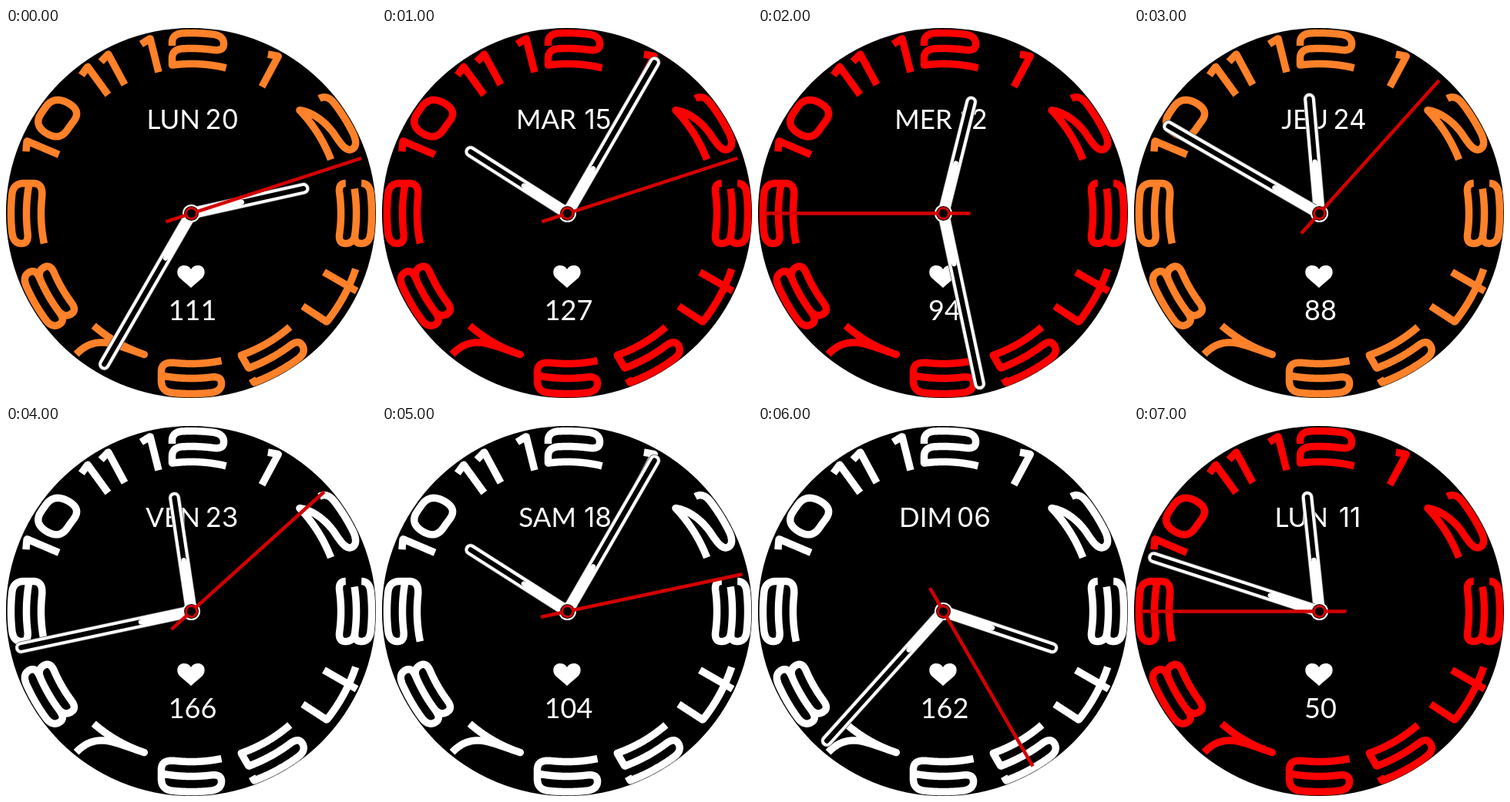
Animation, 480 px wide and 480 px high, one loop 8 s. Source, as an HTML page with a canvas:

```html
<!DOCTYPE html>
<html lang="fr">
<head>
<meta charset="utf-8">
<style>
  html, body { margin: 0; width: 100%; height: 100%; overflow: hidden; background: #fff; }
  canvas { display: block; }
</style>
</head>
<body>
<canvas id="face" width="480" height="480"></canvas>
<script>
const ctx = document.getElementById('face').getContext('2d');
const ORANGE = '#ff8129', RED = '#ff0000', WHITE = '#ffffff';

// numeral colour, weekday, date, pulse, hour, minute, second
const STATES = [
  [ORANGE, 'LUN', '20', 111, 2, 35, 12],
  [RED, 'MAR', '15', 127, 10, 5, 12],
  [RED, 'MER', '12', 94, 12, 28, 45],
  [ORANGE, 'JEU', '24', 88, 11, 50, 7],
  [WHITE, 'VEN', '23', 166, 11, 43, 8],
  [WHITE, 'SAM', '18', 104, 10, 5, 13],
  [WHITE, 'DIM', '06', 162, 3, 37, 25],
  [RED, 'LUN', '11', 50, 11, 48, 45],
];

// Bends a flat outline so that each y becomes a radius around the dial centre
function bend(d) {
  const bent = new Path2D();
  const flat = document.createElementNS('http://www.w3.org/2000/svg', 'path');
  for (const part of d.split('M').slice(1)) {
    flat.setAttribute('d', 'M' + part);
    const length = flat.getTotalLength(), steps = Math.ceil(length);
    for (let i = 0; i <= steps; i++) {
      const { x, y } = flat.getPointAtLength(length * i / steps);
      bent.lineTo(x, Math.sign(y) * Math.sqrt(y * y - x * x));
    }
    bent.moveTo(0, 0);
  }
  return bent;
}

function bendParts(d) {
  const whole = new Path2D();
  for (const part of d.split('M').slice(1)) whole.addPath(bend('M' + part));
  return whole;
}

// Numerals, each turned by its own angle around the dial centre
const ONE = 'M-10 -229L3 -233V-188';
const SIX = 'M39 195H-20Q-39 195 -39 209V221Q-39 234 -25 234H25Q39 234 39 224Q39 214 25 214H-38';
const NUMERALS = [
  [-14, ONE],
  [0, 'M-25 -219V-223Q-25 -234 -11 -234H28Q42 -234 42 -224Q42 -214 28 -214H-11Q-25 -214 -25 -203V-194H45'],
  [28.2, ONE],
  [60, 'M-46 -223Q-46 -234 -31 -234H14Q33 -234 32 -224Q31 -214 4 -212Q-31 -208 -46 -194H30'],
  [90, 'M-39 -224Q-39 -234 -26 -234H26Q39 -234 39 -224Q39 -214 27 -214H-32M27 -214Q39 -214 39 -204Q39 -194 26 -194H-26Q-39 -194 -39 -204'],
  [-60, 'M-32 188L-34 225H44M20 188V237'],
  [-30, 'M37 195H-36V214H25Q39 214 39 224Q39 234 25 234H-39V228'],
  [0, SIX],
  [30, 'M-37 193H39Q5 193 -12 201Q-32 211 -38 236'],
  [60, 'M-22 214Q-35 214 -35 204Q-35 194 -22 194H22Q35 194 35 204Q35 214 22 214H-25Q-39 214 -39 224Q-39 234 -25 234H25Q39 234 39 224Q39 214 25 214'],
  [90, SIX],
  [-67, ONE],
  [-60, 'M14 -234H26Q44 -234 44 -214Q44 -194 26 -194H14Q-4 -194 -4 -214Q-4 -234 14 -234Z'],
  [-36, ONE],
  [-28.3, ONE],
].map(([angle, d]) => [angle, bendParts(d)]);

const HEART = new Path2D('M240 337L225 324C220 318 222 308 231 308Q237 308 240 313Q243 308 249 308C258 308 260 318 255 324Z');

function turned(degrees, draw) {
  ctx.save();
  ctx.translate(240.5, 240.5);
  ctx.rotate(degrees * Math.PI / 180);
  draw();
  ctx.restore();
}

function bar(from, to, width, color, cap = 'round') {
  ctx.lineCap = cap;
  ctx.lineWidth = width;
  ctx.strokeStyle = color;
  ctx.beginPath();
  ctx.moveTo(0, -from);
  ctx.lineTo(0, -to);
  ctx.stroke();
}

function disc(x, y, radius, color) {
  ctx.fillStyle = color;
  ctx.beginPath();
  ctx.arc(x, y, radius, 0, 2 * Math.PI);
  ctx.fill();
}

function hand(degrees, length) {
  turned(degrees, () => {
    bar(8, length, 16, '#555');
    bar(8, length, 14.5, WHITE);
    bar(66, 70, 6.5, '#000', 'butt');
    bar(70, length, 6.5, '#000');
    disc(0, -67, 3.2, WHITE);
  });
}

function text(value, x, y, font, align) {
  ctx.font = font;
  ctx.textAlign = align;
  ctx.fillText(value, x, y);
}

function draw([color, day, date, pulse, hour, minute, second]) {
  ctx.fillStyle = WHITE;
  ctx.fillRect(0, 0, 480, 480);
  disc(240, 240, 240, '#000');

  for (const [angle, path] of NUMERALS) turned(angle, () => {
    ctx.lineCap = 'butt';
    ctx.lineJoin = 'round';
    ctx.lineWidth = 9.5;
    ctx.strokeStyle = color;
    ctx.stroke(path);
  });

  ctx.fillStyle = WHITE;
  text(day, 252, 131, '35px Lato, sans-serif', 'right');
  text(date, 280, 131, '35px Inter, sans-serif', 'center');
  text(pulse, 242, 379, '36px Lato, sans-serif', 'center');
  ctx.fill(HEART);

  hand(hour * 30 + minute / 2, 149);
  hand(minute * 6, 226);
  disc(240.5, 240.5, 11.5, WHITE);
  disc(240.5, 240.5, 9.5, '#000');
  turned(second * 6, () => bar(-35, 232, 4.5, '#d40000', 'butt'));
  disc(240.5, 240.5, 8.5, '#d40000');
  disc(240.5, 240.5, 5.5, '#000');
}

function tick() {
  draw(STATES[Math.floor(performance.now() / 1000) % STATES.length]);
  requestAnimationFrame(tick);
}
tick();
</script>
</body>
</html>
```
